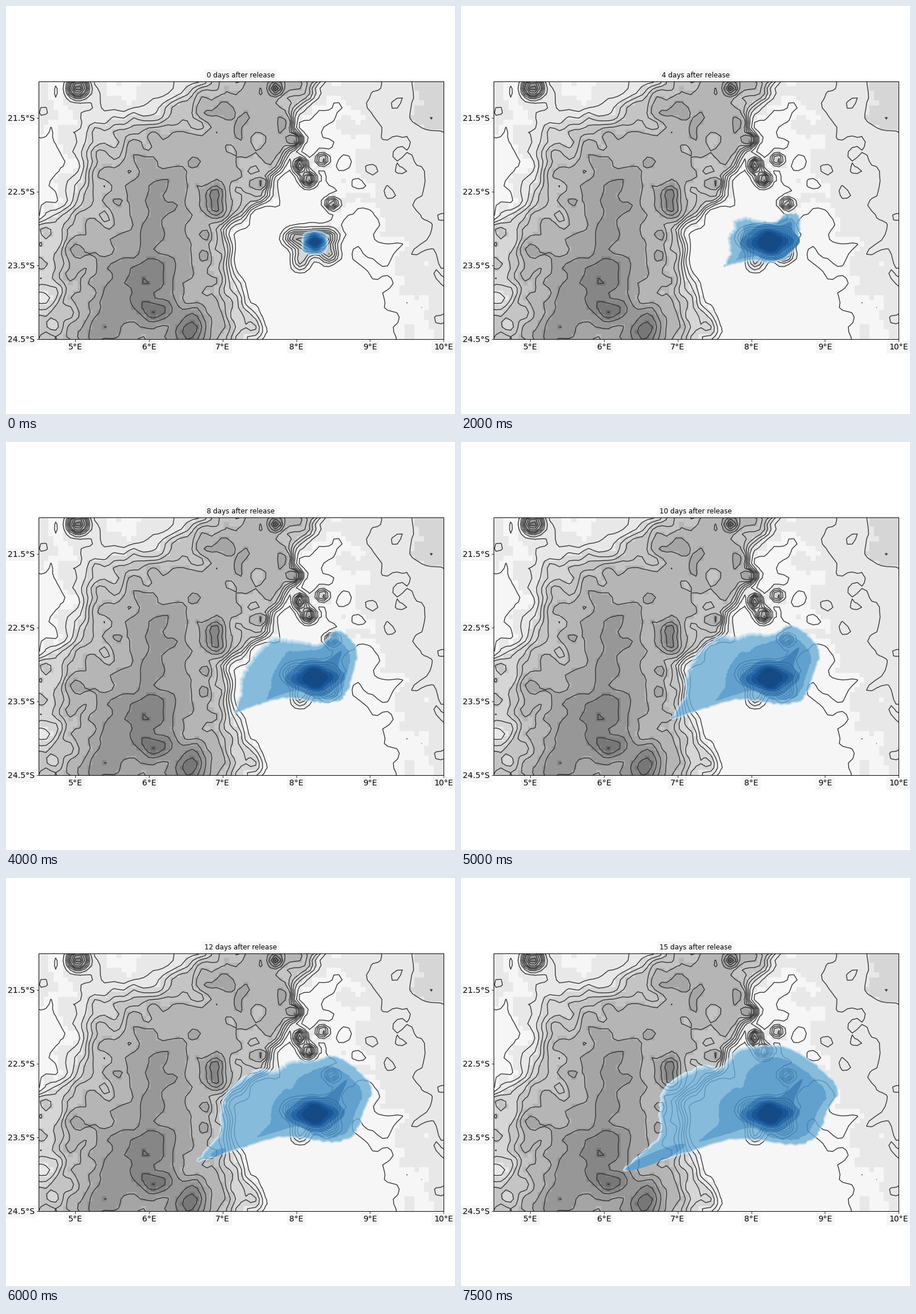
A matplotlib script that plays this animation: 785 px wide and 714 px high, repeating every 8000 ms.

```python
import numpy as np
import matplotlib.pyplot as plt
from matplotlib.animation import FuncAnimation
from matplotlib.colors import BoundaryNorm, ListedColormap
from matplotlib.patches import Polygon, Rectangle
from matplotlib.path import Path

W, H, DPI = 785, 714, 64
PT = 72 / DPI                       # points per pixel
X0, X1, Y0, Y1 = 57, 765, 131.5, 583
NX, NY = 83, 53
PALE = "#f6f6f6"
rng = np.random.default_rng(11)

fig = plt.figure(figsize=(W / DPI, H / DPI), dpi=DPI, facecolor="white")
ax = fig.add_axes([0, 0, 1, 1])
ax.axis("off")
frame = Rectangle((X0, Y0), X1 - X0, Y1 - Y0, fc="none", ec="black", lw=PT, zorder=8)
ax.add_patch(frame)

# ---------- sea floor: height on a grid one cell wider than the map ----------
dx, dy = (X1 - X0) / NX, (Y1 - Y0) / NY
gx, gy = np.meshgrid(X0 + (np.arange(-1, NX + 1) + 0.5) * dx,
                     Y0 + (np.arange(-1, NY + 1) + 0.5) * dy)


def sig(v):
    return 1 / (1 + np.exp(-np.clip(v, -40, 40)))


def noise(blurs):
    """Smooth random field with unit deviation."""
    f = rng.normal(size=gx.shape)
    for _ in range(blurs):
        for axis in (0, 1):
            f = (np.roll(f, 1, axis) + 2 * f + np.roll(f, -1, axis)) / 4
    return f / f.std()


def depth_inside(corners):
    """Signed distance to the edge of a polygon, positive inside."""
    p = np.reshape(corners, (-1, 2)).astype(float)
    dist = np.full(gx.shape, 1e9)
    for (ax_, ay), (bx, by) in zip(p, np.roll(p, -1, axis=0)):
        ux, uy = bx - ax_, by - ay
        t = np.clip(((gx - ax_) * ux + (gy - ay) * uy) / (ux * ux + uy * uy), 0, 1)
        dist = np.minimum(dist, np.hypot(gx - ax_ - t * ux, gy - ay - t * uy))
    inside = Path(p).contains_points(np.column_stack([gx.ravel(), gy.ravel()]))
    return np.where(inside.reshape(gx.shape), dist, -dist)


RIDGE = [-150, 375, 40, 372, 95, 358, 124, 330, 134, 262, 160, 217, 235, 205, 300, 174, 350, 135,
         400, -100, 600, -100, 552, 135, 505, 195, 499, 262, 455, 325, 418, 362, 378, 393,
         386, 440, 408, 500, 434, 550, 442, 583, 450, 800, -150, 800]
# x, y, spread in x, spread in y, height
SEAMOUNTS = [(126, 143, 11, 11, 7), (472, 145, 8, 8, 5), (505, 234, 8, 8, 5), (514, 279, 7, 9, 5.5),
             (529, 303, 8, 8, 5), (553, 268, 7, 7, 2.8), (570, 346, 8, 7, 3.8), (450, 310, 9, 6, 2),
             (365, 328, 12, 11, 3.4), (366, 357, 12, 11, 3.2), (350, 401, 6, 8, 2), (347, 435, 6, 9, 2.2),
             (538, 413, 19, 14, 5), (503, 405, 12, 10, 2.6), (514, 445, 10, 13, 2.4),
             (566, 436, 11, 10, 2.4), (564, 402, 12, 9, 2.2)]
SWELLS = [(250, 385, 55, 70, 1.2), (240, 500, 36, 42, 2.7), (265, 540, 24, 15, 1.6),
          (172, 540, 22, 60, 1.2), (322, 572, 18, 24, 3.2), (50, 500, 50, 130, -2.6),
          (405, 570, 40, 60, -0.8), (745, 185, 28, 45, 0.5), (395, 180, 28, 22, 0.6),
          (380, 225, 60, 20, -0.5)]

d = depth_inside(RIDGE) + 4 * noise(3)
width = 6 + 7 * sig((330 - gx) / 30) * sig((400 - gy) / 20) + 4 * sig((gy - 450) / 25)
ridge = sig(d / width)
east = gx - 570 - 0.38 * (gy - 165)
plain = np.maximum(0.38, 0.95 + 0.0045 * east) + 0.7 * sig((350 - gx) / 20)
height = plain * (1 - ridge) + (3.9 + 0.01 * np.clip(d, 0, 90)) * ridge
height += (0.13 + 0.2 * ridge) * noise(2) + (0.05 + 0.25 * ridge) * noise(10)
for x, y, sx, sy, top in SEAMOUNTS + SWELLS:
    height += top * np.exp(-((gx - x) / sx) ** 2 / 2 - ((gy - y) / sy) ** 2 / 2)

GREYS = [246, 232, 214, 196, 181, 165, 151, 134, 119, 104, 90]
tones = ListedColormap([(g / 255,) * 3 for g in GREYS])
steps = BoundaryNorm([-9, *range(1, len(GREYS)), 99], len(GREYS))
floor = ax.imshow(height, cmap=tones, norm=steps, interpolation="nearest", aspect="auto", zorder=1,
                  extent=(X0 - dx, X1 + dx, Y1 + dy, Y0 - dy))
levels = [*np.arange(0.8, 4.2, 0.55), *range(5, 11)]
land = ax.contour(gx, gy, height, levels, colors="#303030", linewidths=1.35 * PT, zorder=2)
veil = ax.contour(gx, gy, height, levels, colors="#144a80", alpha=0.42, linewidths=1.2 * PT, zorder=5)
for artist in (floor, land):
    artist.set_clip_path(frame)
ax.set(xlim=(0, W), ylim=(H, 0))

# ---------- drifting cloud ----------
CORE = np.array([540, 413])
# outline on four days, clockwise from the south-west tip
OUTLINE = {
    0: [518, 430, 517, 420, 517, 408, 520, 399, 526, 395, 534, 394, 541, 393, 548, 394,
        555, 396, 561, 400, 563, 408, 563, 420, 560, 429, 551, 435, 538, 436, 527, 435],
    4: [460, 456, 469, 432, 467, 404, 477, 388, 476, 376, 497, 369, 518, 373, 548, 377,
        568, 363, 590, 364, 594, 385, 588, 415, 572, 441, 540, 450, 512, 446, 487, 450],
    8: [402, 474, 409, 440, 411, 412, 428, 380, 465, 343, 490, 345, 515, 347, 550, 352,
        577, 329, 602, 342, 615, 370, 606, 410, 590, 450, 550, 457, 490, 449, 440, 461],
    15: [285, 512, 345, 452, 346, 410, 357, 365, 420, 328, 455, 330, 484, 299, 530, 293,
         575, 297, 632, 335, 660, 372, 640, 410, 625, 450, 585, 468, 480, 458, 390, 483],
}
DAYS = sorted(OUTLINE)
KEYS = np.array([OUTLINE[k] for k in DAYS], float)
PER = 10
ragged = rng.normal(0, 0.9, (KEYS.shape[1] // 2 * PER, 2))
angle = np.linspace(0, 2 * np.pi, 90, endpoint=False)


def smooth(p):
    """Closed Catmull-Rom curve through the points."""
    t = np.linspace(0, 1, PER, endpoint=False)[None, :, None]
    a, b, c, e = (np.roll(p, k, axis=0)[:, None] for k in (1, 0, -1, -2))
    q = 2 * b + (c - a) * t + (2 * a - 5 * b + 4 * c - e) * t**2 + (3 * b - a - 3 * c + e) * t**3
    return q.reshape(-1, 2) / 2


def cloud(day):
    p = np.array([np.interp(day, DAYS, col) for col in KEYS.T]).reshape(-1, 2)
    return p[0], smooth(p) + ragged * min(1, day / 4)


def inset(p, depth):
    t = np.roll(p, -5, axis=0) - np.roll(p, 5, axis=0)
    t /= np.hypot(*t.T)[:, None] + 1e-6
    return p + np.column_stack([-t[:, 1], t[:, 0]]) * depth[:, None]


def middle(edge, day):
    """Denser part: the outline drawn in towards the core, most in the west."""
    v = edge - CORE
    west = np.clip(-v[:, 0] / np.hypot(*v.T), 0, 1)
    return CORE + v * (0.82 - 0.36 * min(1, day / 12) * west)[:, None]


def tail(tip, day):
    age = max(0, day - 11)
    if not age:
        return np.full((3, 2), -50.0)
    axis = np.array([0.92, -0.39])
    long, short = 14 * age * np.cos(angle), (4 + 1.3 * age) * np.sin(angle)
    mid = tip + axis * (14 * age + 7 * (15 - day) + 4)
    return mid + np.outer(long, axis) + np.outer(short, [0.39, 0.92])


def blot(rx, ry, arm=0):
    r = 1 + 0.08 * np.cos(4 * angle + 0.6)
    p = np.column_stack([rx * r * np.cos(angle), ry * r * np.sin(angle)])
    reach = arm * np.exp(-((angle - 2 * np.pi + 0.92) / 0.2) ** 2)
    return CORE + p + np.column_stack([0.6 * reach, -0.8 * reach])


BLUES = ["#d0e4f1", "#aed2e7", "#86bbdb", "#62a1ce", "#62a1ce", "#4283b9", "#2a6bab", "#1b579a", "#154a85"]
shapes = [ax.add_patch(Polygon([(0, 0), (1, 0), (0, 1)], fc=c, ec="none", zorder=3 + i / 10))
          for i, c in enumerate(BLUES)]

# ---------- labels ----------


def label(x, y, s, size, ha="center"):
    return ax.text(x, y, s, fontsize=size * PT, family="DejaVu Sans", ha=ha, va="baseline",
                   zorder=10, bbox=dict(fc=PALE, ec="none", pad=4 * PT))


def tick(x, y):
    ax.plot(x, y, color="black", lw=0.8 * PT, zorder=11)


for i in range(4):
    y = 196.3 + 128.9 * i
    label(50, y + 5, f"{21.5 + i}°S", 14, "right")
    tick([53.5, 57], [y, y])
for i in range(6):
    x = 121.3 + 128.75 * i
    label(x, 601, f"{5 + i}°E", 14)
    tick([x, x], [583, 586.5])
title = label(410.7, 125, "", 11.9)


def draw(day):
    title.set_text(f"{day} days after release")
    tip, edge = cloud(day)
    grow = min(1, day / 4)
    u = np.linspace(0, 1, len(edge))
    fringe = 1.5 + 2.2 * min(1, day / 6) * np.sin(np.pi * np.clip(u / 0.5, 0, 1))
    layers = [edge, inset(edge, fringe), inset(edge, 2 * fringe), tail(tip, day), middle(edge, day),
              blot(17 + 32 * grow, 16 + 14 * grow, min(50, 4 * day))]
    layers += [blot(15 - 3 * k + (24 - 6 * k) * grow, 13 - 3 * k + 9 * grow) for k in range(3)]
    for patch, xy in zip(shapes, layers):
        patch.set_xy(xy)
    veil.set_clip_path(shapes[0])
    return [title, veil, *shapes]


anim = FuncAnimation(fig, draw, frames=16, interval=500, repeat=True, repeat_delay=0, blit=False)
plt.show()
```
